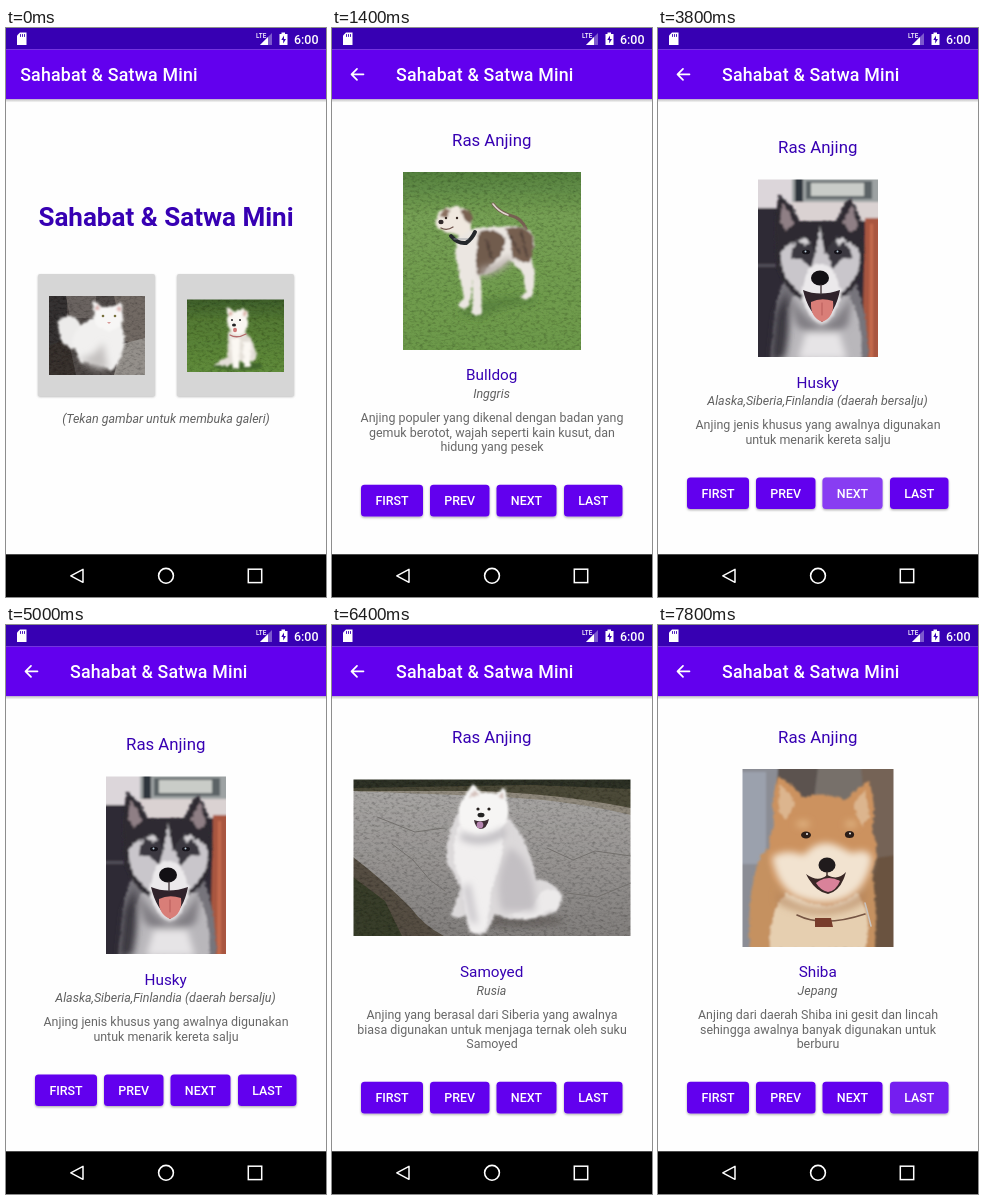
Animation, 320 px wide and 569 px high, one loop 8000 ms. Source, as an HTML page:

```html
<!DOCTYPE html>
<html lang="id">
<head>
<meta charset="utf-8">
<title>Sahabat &amp; Satwa Mini</title>
<style>
html, body { margin: 0; width: 100%; height: 100%; overflow: hidden; background: #fefefe; }
svg { display: block; }
#stage { width: 100vw; height: 100vh; }
text { font-family: Roboto, "Noto Sans", sans-serif; }
.mid { text-anchor: middle; }
.bar { font-size: 17.78px; font-weight: 500; letter-spacing: .2px; fill: #fff; }
.btn { font-size: 12.44px; font-weight: 500; fill: #fff; }
.small { font-size: 12.44px; fill: #686868; }
.it { font-style: italic; fill: #606060; }
.blue { fill: #3700b3; }
</style>
</head>
<body>
<svg id="stage" viewBox="0 0 320 569" preserveAspectRatio="none">
  <defs>
    <filter id="shade" x="-10%" y="-20%" width="120%" height="160%">
      <feDropShadow dx="0" dy="1.2" stdDeviation="1" flood-opacity=".32"/>
    </filter>
    <filter id="soft"><feGaussianBlur stdDeviation="1"/></filter>
    <filter id="haze" x="-30%" y="-30%" width="160%" height="160%"><feGaussianBlur stdDeviation="3.5"/></filter>
    <filter id="fur" x="-10%" y="-10%" width="120%" height="120%">
      <feTurbulence type="fractalNoise" baseFrequency=".3" numOctaves="2" seed="4"/>
      <feDisplacementMap in="SourceGraphic" scale="4" xChannelSelector="R" yChannelSelector="G"/>
      <feGaussianBlur stdDeviation=".8"/>
    </filter>
    <filter id="grain" x="0" y="0" width="100%" height="100%">
      <feTurbulence type="fractalNoise" baseFrequency=".25 .4" numOctaves="3" seed="7"/>
      <feColorMatrix values="0 0 0 0 0  0 0 0 0 0  0 0 0 0 0  1 0 0 0 -.44"/>
      <feComposite operator="in" in2="SourceGraphic" result="n"/>
      <feMerge><feMergeNode in="SourceGraphic"/><feMergeNode in="n"/></feMerge>
    </filter>
    <linearGradient id="grass" x2="0" y2="1">
      <stop offset="0" stop-color="#55813f"/><stop offset=".25" stop-color="#76a054"/><stop offset="1" stop-color="#6c994a"/>
    </linearGradient>
    <linearGradient id="lawn" x2="0" y2="1">
      <stop offset="0" stop-color="#3d5d2b"/><stop offset=".3" stop-color="#547a34"/><stop offset="1" stop-color="#608c3b"/>
    </linearGradient>
    <linearGradient id="road" x2="0" y2="1">
      <stop offset="0" stop-color="#aaa8a6"/><stop offset=".5" stop-color="#979492"/><stop offset="1" stop-color="#817e7c"/>
    </linearGradient>
    <linearGradient id="drop" x2="0" y2="1">
      <stop offset="0" stop-opacity=".24"/><stop offset="1" stop-opacity="0"/>
    </linearGradient>
  </defs>
  <rect width="320" height="569" fill="#fefefe"/>
  <g id="home"></g>
  <g id="detail"></g>
  <g id="system"></g>
</svg>
<script>
const LOOP = 8000, TITLE = 'Sahabat &amp; Satwa Mini';
const $ = id => document.getElementById(id);

const path = (d, fill, extra = '') => `<path d="${d}" fill="${fill}" ${extra}/>`;
const line = (d, color, w) => path(d, 'none', `stroke="${color}" stroke-width="${w}" stroke-linecap="round" stroke-linejoin="round"`);
const rect = (x, y, w, h, fill, extra = '') => `<rect x="${x}" y="${y}" width="${w}" height="${h}" fill="${fill}" ${extra}/>`;
const oval = (x, y, rx, ry, fill, extra = '') => `<ellipse cx="${x}" cy="${y}" rx="${rx}" ry="${ry}" fill="${fill}" ${extra}/>`;
const dots = (points, r, fill) => points.map(([x, y]) => oval(x, y, r, r, fill)).join('');
const text = (x, y, s, cls, extra = '') => `<text x="${x}" y="${y}" class="${cls}" ${extra}>${s}</text>`;
const group = (filter, ...parts) => `<g filter="url(#${filter})">${parts.join('')}</g>`;
const photo = (x, y, w, h, ...parts) =>
  `<svg x="${x}" y="${y}" width="${w}" height="${h}" viewBox="${x} ${y} ${w} ${h}" overflow="hidden">${parts.join('')}</svg>`;

const catPhoto = () => photo(43, 268, 96, 79,
  group('grain',
    rect(43, 268, 96, 79, '#504a47'),
    rect(43, 268, 18, 79, '#343130'),
    path('M60 268H90V290H64Z', '#6b6460'),
    path('M108 268H139V322L118 312Z', '#716963'),
    path('M43 318L62 310L70 347H43Z', '#37322f'),
    path('M116 316L139 310V347H108Z', '#94908b')),
  group('fur',
    path('M70 322Q54 318 53 303Q49 289 59 289Q66 285 73 294L80 308Z', '#ecebea'),
    path('M66 314Q68 298 88 289L113 292Q122 308 117 322Q113 337 105 342L91 336L74 334Z', '#f1f0ef'),
    path('M88 293L87 272L96 279H107L116 274L117 293Q112 302 103 303Q93 302 88 293Z', '#f7f6f5'),
    path('M90 283L90 276L94 280ZM110 281L114 277L114 284Z', '#dcaeaa')),
  group('haze', path('M72 331Q91 328 97 314L102 341H91Z', '#c4c1c0')),
  dots([[97, 288], [109, 288]], 1.3, '#77703d'),
  path('M101 294H105L103 296Z', '#d89a98'));

const puppyPhoto = () => photo(181, 271.5, 97, 72.5,
  group('grain', rect(181, 271, 97, 74, 'url(#lawn)')),
  oval(232, 338, 25, 4, '#3f652b', 'filter="url(#soft)"'),
  group('fur',
    path('M222 306Q222 300 238 302Q251 316 250 331Q240 338 232 332L222 338L207 337L221 329Z', '#e4dfd8'),
    path('M225 310H234L233 341H227ZM237 314H245L244 339H238Z', '#fbf8f3'),
    path('M221 293L221 279L229 284L237 280L242 284L242 298Q239 307 231 307Q223 304 221 293Z', '#faf7f2'),
    path('M223 288L223 282L227 286ZM237 285L240 283L240 289Z', '#d9ada0')),
  dots([[226, 292], [234, 292]], 1, '#222'),
  oval(228, 297, 2, 1.5, '#222'), oval(229, 302, 2, 2.2, '#cf7876'),
  line('M224 307Q231 311 240 306', '#b36b6b', 1.4));

const bulldog = () => photo(71, 144, 178, 178,
  group('grain', rect(71, 144, 178, 178, 'url(#grass)')),
  group('haze', path('M130 279Q160 267 205 268L202 275Q165 278 149 291L128 286Z', '#496e34', 'opacity=".5"')),
  line('M194 201Q190 190 177 187Q167 184 161 176', '#765f51', 3.2),
  line('M176 187Q167 184 161 176', '#e0d7cf', 1.6),
  group('fur',
    path('M128 204Q145 198 168 199Q190 195 199 204Q205 214 199 228L203 246L201 268Q195 273 188 269L194 264L190 244L177 232Q161 246 149 247L150 285Q145 291 140 285L141 250L138 276Q132 285 126 277L132 270L126 240Q120 222 128 204Z', '#ebe6e1'),
    path('M147 204Q162 198 174 211Q169 231 158 238Q150 249 145 246Q143 225 147 204Z', '#715b4d'),
    path('M173 201Q192 195 200 207Q203 219 198 234Q187 235 180 228Q180 210 173 201Z', '#765f50'),
    path('M178 207L188 226M189 203L195 229M154 211L160 231', 'none', 'stroke="#4f4037" stroke-width="2"'),
    path('M104 191Q107 179 121 179Q136 177 140 190Q140 204 130 208L117 205L107 201Q102 197 104 191Z', '#f0e8df'),
    path('M128 181Q139 180 141 190L138 196Q131 192 128 181Z', '#78604f'),
    path('M108 188L112 180L119 182L114 190Z', '#8a705f')),
  group('haze', path('M148 240Q168 238 178 227L180 234Q164 248 148 248Z', '#b3aaa4')),
  line('M119 208Q126 216 134 215Q140 211 143 204', '#24272b', 4),
  line('M122 211L136 211', '#8f949b', .8),
  dots([[114, 190], [125, 190]], 1.2, '#33251f'),
  oval(109, 194, 2.6, 2.2, '#30292a'), line('M109 200Q115 203 121 199', '#6d5149', 1.3));

const husky = () => photo(100, 151.5, 120, 177.5,
  group('soft',
    rect(98, 149, 124, 182, '#2e2a35'),
    rect(98, 149, 37, 31, '#dcd6da'),
    rect(98, 236, 20, 3, '#514d59'),
    rect(134, 149, 88, 26, '#9da2a3'), rect(137, 149, 8, 25, '#2f363c'),
    rect(148, 153, 66, 18, '#5c6466'), rect(153, 155, 53, 13, '#c9ccc8'),
    rect(133, 174, 89, 19, '#dad2d2'),
    path('M207 190H222V331H204Z', '#a9563f'),
    path('M212 196H215V331H211Z', '#c56a4e')),
  group('fur',
    path('M112 331L117 287Q121 250 136 240H189Q208 262 211 331Z', '#77757b'),
    path('M121 331Q122 286 136 268L191 268Q206 292 203 331Z', '#b9b7bb'),
    path('M118 216Q116 190 121 167Q134 174 142 194H178Q184 177 192 170Q205 188 205 214Q208 241 196 259Q184 274 163 276Q139 274 129 259Q115 242 118 216Z', '#2d2b31'),
    path('M122 194L124 175Q132 184 136 196L128 203ZM185 195Q189 184 194 178L200 198L193 205Z', '#8f7f85'),
    path('M123 224Q130 213 141 216L157 226L162 198L167 226L180 215Q194 211 201 222Q205 241 192 256Q181 272 164 277Q146 272 134 257Q121 243 123 224Z', '#c9c6cb'),
    path('M134 222L146 207L158 223L153 240L144 231L133 231ZM168 223L179 207L192 221L194 230L183 231L175 241Z', '#3b393f'),
    path('M139 213Q146 206 152 214L147 217ZM176 214Q182 206 189 213L181 217Z', '#d4d1d5'),
    path('M150 241Q162 230 175 242L184 263Q178 294 163 297Q149 292 143 264Z', '#ebe9eb')),
  group('haze',
    path('M113 331L118 285L129 262Q134 300 126 331Z', '#3a383f'),
    path('M130 262Q145 290 163 299Q183 290 195 262L190 297Q164 318 138 297Z', '#737077', 'opacity=".8"'),
    path('M140 331L148 304H181L189 331Z', '#e6e4e6')),
  oval(148, 224, 4, 2.3, '#15131a'), oval(180, 224, 4, 2.3, '#15131a'),
  dots([[147.5, 223.5], [179.5, 223.5]], 1, '#b7cad8'),
  path('M145 262Q162 269 182 262Q178 284 164 294Q150 284 145 262Z', '#30232b'),
  path('M153 274Q163 269 175 273Q177 289 164 294Q152 289 153 274Z', '#d97e78'),
  line('M164 275V287', '#b75b58', 1),
  oval(162, 250, 9, 7.5, '#121014'), line('M163 257V266', '#44383d', 1.4));

const samoyed = () => photo(21.5, 154.5, 277, 156.5,
  group('grain',
    rect(21, 154, 279, 158, 'url(#road)'),
    path('M21 154H299V188Q230 171 150 169L21 166Z', '#4c4837'),
    path('M21 154H299V164L200 160L21 163Z', '#2e3226'),
    path('M21 166L150 171Q235 174 299 190V183Q230 169 150 166Z', '#8f887b'),
    path('M21 232Q50 254 78 282Q92 301 112 311H21Z', '#554e42'),
    path('M21 252L53 276L70 311H21Z', '#393c2b')),
  line('M60 219L81 235L98 255L113 266M215 223L241 235L263 226L299 231M235 268L265 272L299 258M45 192L83 207L112 203', '#73706d', 1),
  group('haze', oval(187, 296, 46, 6, '#55514e', 'opacity=".6"')),
  group('fur',
    path('M126 187Q113 211 115 237L129 263L119 290Q124 296 134 290L137 307Q148 312 155 306L163 289Q178 299 207 291Q231 290 230 270Q221 255 204 254Q197 216 178 194Z', '#dcd9da'),
    path('M128 197Q115 230 129 255L134 290L139 306Q149 310 154 304L160 262Q176 230 168 203Z', '#f1efef'),
    path('M176 290Q205 299 215 286Q229 286 229 270Q217 258 207 270Q204 283 176 290Z', '#eceaea'),
    path('M128 192Q124 182 131 174L141 159L150 168Q159 166 164 169L173 163L176 181Q178 197 167 205Q150 213 136 207Q127 203 128 192Z', '#f6f5f4'),
    path('M137 172L142 164L147 170ZM166 171L171 167L172 176Z', '#d5c2bd')),
  group('haze',
    path('M129 207Q150 217 172 202L174 211Q150 225 128 214Z', '#bebbc0'),
    path('M178 222Q160 255 170 286L203 286Q205 255 190 232Z', '#c3bfc3'),
    path('M131 262L138 258L146 300L138 296Z', '#c9c6ca')),
  dots([[146, 184], [157, 184]], 1.6, '#27211f'),
  oval(149, 190, 3.5, 2.3, '#222'),
  path('M142 195Q150 198 157 194Q155 204 148 204Q143 202 142 195Z', '#3d2d34'),
  oval(148, 200, 3.3, 3.4, '#b585b0'));

const shiba = () => photo(84.5, 144, 151, 178,
  group('soft',
    rect(82, 142, 156, 182, '#77706b'),
    rect(82, 142, 38, 182, '#8b8d95'), rect(82, 147, 26, 92, '#9ba1ad'),
    path('M120 142H160L154 190H118Z', '#5b5350'),
    path('M203 142H238V234H211Z', '#756456'),
    path('M211 234L238 230V324H200Z', '#6b5341')),
  group('fur',
    path('M92 324Q88 268 103 230L126 211L205 222Q221 251 217 324Z', '#c59160'),
    path('M112 324Q110 285 130 267L197 265Q216 289 207 324Z', '#e6cfb0'),
    path('M116 198Q113 169 120 152Q133 157 145 172Q168 166 188 175Q199 162 211 156Q219 180 214 207Q224 225 214 246Q201 277 169 281Q132 277 114 254Q105 230 116 198Z', '#cc925e'),
    path('M121 187L122 161Q132 166 137 179L128 195ZM195 181Q203 168 208 165L211 193L204 201Z', '#dcb58e')),
  group('haze',
    path('M114 232Q128 223 145 230L156 221Q168 215 180 221L194 228Q211 222 214 234Q209 262 190 272Q168 283 139 272Q119 262 114 232Z', '#f2e3d0'),
    path('M118 266Q165 302 210 262L208 276Q167 302 119 278Z', '#b3835a', 'opacity=".6"'),
    oval(145, 199, 7, 3, '#e3b988'), oval(193, 199, 6, 3, '#e3b988')),
  oval(148, 210, 5, 3.5, '#2b1d17'), oval(191.5, 209.5, 4.6, 3.5, '#2b1d17'),
  dots([[149, 209], [192, 208.5]], 1, '#eee'),
  path('M148 249Q160 258 169 250Q180 256 188 247Q183 266 170 269Q157 267 148 249Z', '#392725'),
  path('M158 258Q169 249 182 256Q178 266 170 267Q162 265 158 258Z', '#d9829a'),
  oval(169, 240, 8.5, 7.5, '#201b1c'), line('M169 247V252', '#40312d', 1.5),
  line('M139 290Q165 303 207 289', '#755443', 1.6),
  path('M157 293H173L175 302H157Z', '#783c2b'),
  line('M207 278L213 301', '#c8c2bd', 1.6));

const pets = [
  { name: 'Bulldog', from: 'Inggris', draw: bulldog,
    about: ['Anjing populer yang dikenal dengan badan yang', 'gemuk berotot, wajah seperti kain kusut, dan', 'hidung yang pesek'] },
  { name: 'Husky', from: 'Alaska,Siberia,Finlandia (daerah bersalju)', draw: husky,
    about: ['Anjing jenis khusus yang awalnya digunakan', 'untuk menarik kereta salju'] },
  { name: 'Samoyed', from: 'Rusia', draw: samoyed,
    about: ['Anjing yang berasal dari Siberia yang awalnya', 'biasa digunakan untuk menjaga ternak oleh suku', 'Samoyed'] },
  { name: 'Shiba', from: 'Jepang', draw: shiba,
    about: ['Anjing dari daerah Shiba ini gesit dan lincah', 'sehingga awalnya banyak digunakan untuk', 'berburu'] }
];
const buttons = [['FIRST', 29, 62], ['PREV', 98, 59.5], ['NEXT', 164.5, 60], ['LAST', 232, 58.5]];
const presses = [{ at: 3550, button: 2 }, { at: 5650, button: 2 }, { at: 7350, button: 3 }];
const CLICK_DELAY = 150;

const page = () => rect(0, 21.3, 320, 505, '#fefefe') + rect(0, 71.1, 320, 3.5, 'url(#drop)') + rect(0, 21.3, 320, 49.8, '#6200ee');

const petView = ({ name, from, about, draw }) => {
  const dy = about.length < 3 ? 7.3 : 0;
  return text(159.7, 118 + dy, 'Ras Anjing', 'mid blue', 'font-size="16.8"') + draw() +
    text(159.7, 352.3 + dy, name, 'mid blue', 'font-size="15.3"') +
    text(159.5, 369.7 + dy, from, 'mid small it') +
    about.map((s, i) => text(160, 394 + dy + i * 14.6, s, 'mid small')).join('');
};

const buttonRow = () => buttons.map(([label, x, w], i) => `
  <g filter="url(#shade)">${rect(x, 456.7, w, 31.7, '#6200ee', 'rx="3.5"')}</g>
  <clipPath id="clip${i}">${rect(x, 456.7, w, 31.7, '#000', 'rx="3.5"')}</clipPath>
  <circle id="ripple${i}" cx="${x + w / 2}" cy="472.5" fill="#fff" clip-path="url(#clip${i})"/>
  ${text(x + w / 2, 477, label, 'mid btn')}`).join('');

$('home').innerHTML = page() + text(14.2, 53.2, TITLE, 'bar') +
  text(160, 198, TITLE, 'mid blue', 'font-size="26" font-weight="700"') +
  group('soft', rect(32, 247, 117, 122, '#bbb', 'rx="2"'), rect(171, 247, 117, 122, '#bbb', 'rx="2"')) +
  rect(32, 246, 117, 122.5, '#d6d6d6', 'rx="2"') + rect(171, 246, 117, 122.5, '#d6d6d6', 'rx="2"') +
  `<clipPath id="tile">${rect(171, 246, 117, 122.5, '#000', 'rx="2"')}</clipPath>
   <circle id="tap" cx="230" cy="308" fill="#000" clip-path="url(#tile)"/>` +
  catPhoto() + puppyPhoto() +
  text(160, 395, '(Tekan gambar untuk membuka galeri)', 'mid small it');

$('detail').innerHTML = page() + line('M31.5 46.3H20M25 40.8L19.5 46.3L25 51.8', '#fff', 1.7) +
  text(64, 53.2, TITLE, 'bar') +
  pets.map((p, i) => `<g id="pet${i}">${petView(p)}</g>`).join('') +
  `<g id="row">${buttonRow()}</g>`;

$('system').innerHTML = rect(0, 0, 320, 21.3, '#3700b3') +
  path('M14 4.5H20.5V17H11V7.5Z', '#fff') + line('M14.5 6.5V8.5M16.5 6.5V8.5M18.5 6.5V8.5', '#3700b3', .9) +
  text(250, 10, 'LTE', '', 'font-size="6.4" font-weight="500" fill="#fff"') +
  path('M266 5V17H254Z', '#fff', 'opacity=".35"') + path('M262 9V17H254Z', '#fff') +
  path('M275.5 4.5H279V6H281.5V17H273.5V6H275.5Z', '#fff') + path('M278 7.5L275.3 12H277.2V15.5L280 11H278Z', '#3700b3') +
  text(288, 15.5, '6:00', '', 'font-size="12.44" font-weight="500" fill="#fff"') +
  rect(0, 526.3, 320, 43, '#000') +
  line('M77 541.3V554.3L64.8 547.8Z', '#fff', 1.5) +
  '<circle cx="160" cy="547.8" r="7.4" fill="none" stroke="#fff" stroke-width="1.6"/>' +
  rect(242.3, 541.2, 13.4, 13.4, 'none', 'stroke="#fff" stroke-width="1.5"');

const clamp = v => Math.min(1, Math.max(0, v));
const set = (id, attrs) => { for (const k in attrs) $(id).setAttribute(k, attrs[k]); };
const show = (id, on) => set(id, { display: on ? 'inline' : 'none' });

// Touch ripple: grows, holds, then fades.
const ripple = (id, age, size, strength) => set(id, {
  r: age < 0 ? 0 : size * (1 - (1 - clamp(age / 240)) ** 2),
  opacity: age < 0 ? 0 : strength * clamp(age / 60) * (1 - clamp((age - 280) / 340))
});

function render(t) {
  const enter = clamp((t - 1080) / 300);
  const ease = 1 - (1 - enter) ** 3;
  show('home', enter < 1);
  show('detail', enter > 0);
  set('detail', { transform: `translate(0 ${40 * (1 - ease)})`, opacity: clamp(enter * 1.6) });
  ripple('tap', t - 850, 85, .14);

  const current = presses.filter(p => t >= p.at + CLICK_DELAY).length;
  pets.forEach((p, i) => show('pet' + i, i === current));
  set('row', { transform: `translate(0 ${pets[current].about.length < 3 ? -7.3 : 0})` });
  buttons.forEach((b, i) => {
    const last = presses.filter(p => p.button === i && t >= p.at).pop();
    ripple('ripple' + i, last ? t - last.at : -1, 36, .24);
  });
}

const start = performance.now();
function tick() {
  render((performance.now() - start) % LOOP);
  requestAnimationFrame(tick);
}
tick();
</script>
</body>
</html>
```
